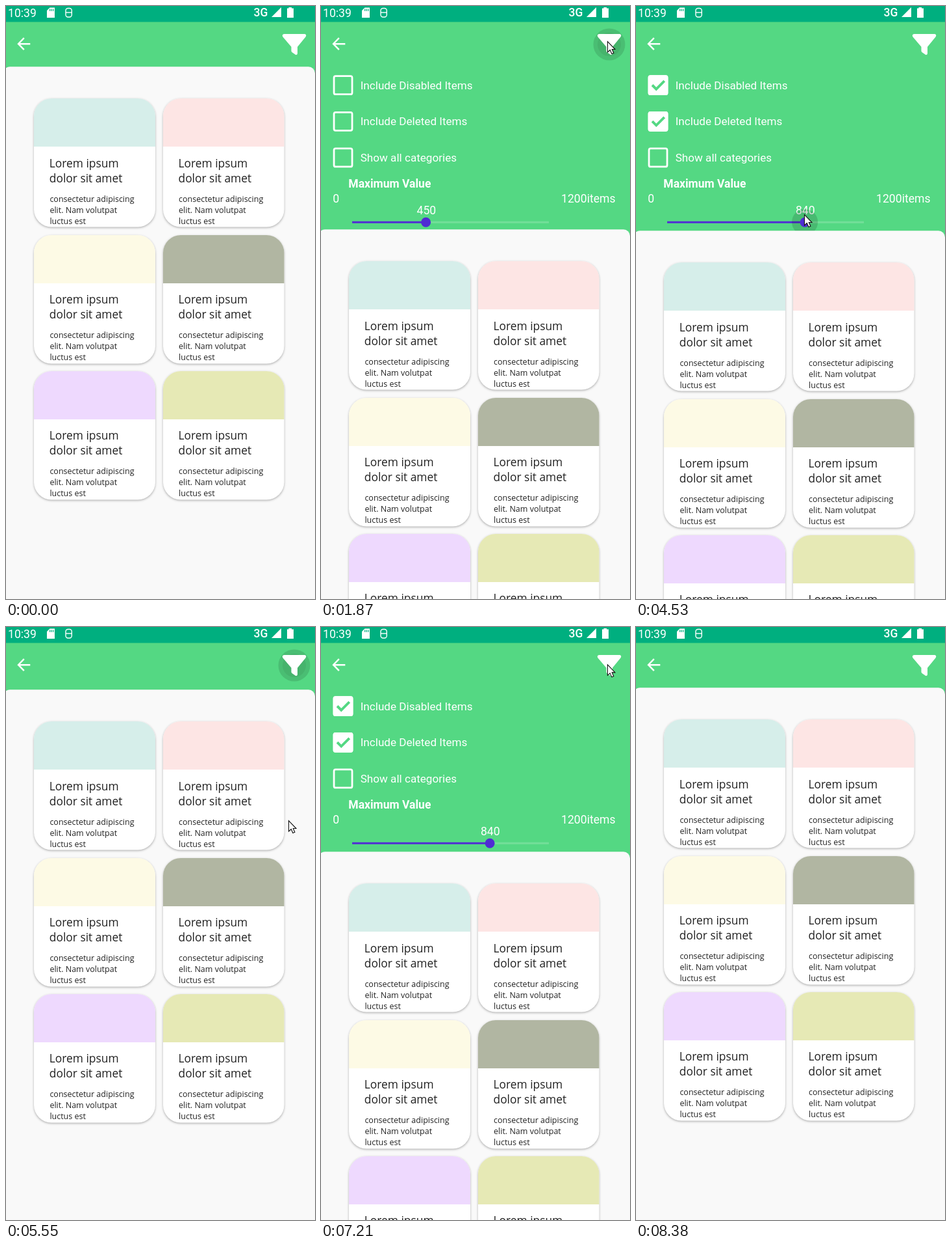
Write an HTML page with a canvas that moves like this. It is 476 px wide and 911 px high and loops after 8.72 s.

```html
<!DOCTYPE html>
<html lang="en">
<head>
<meta charset="utf-8">
<title>Filter panel</title>
<style>
html, body { margin: 0; width: 100%; height: 100%; overflow: hidden; background: #f9f9f9; }
canvas { display: block; width: 476px; height: 911px; }
</style>
</head>
<body>
<canvas id="stage"></canvas>
<script>
const W = 476, H = 911, LOOP = 8720;
const GREEN = '#54d883', TEAL = '#00af7f', INDIGO = '#4f2cd3', INK = '#222';
const CLOSED = 93, OPEN = 345;
const canvas = document.getElementById('stage');
const c = canvas.getContext('2d');
const dpr = window.devicePixelRatio || 1;
canvas.width = W * dpr;
canvas.height = H * dpr;

// Moments at which the sheet starts to toggle
const toggles = [1586, 5272, 6424, 7393];
const DRAG = { start: 4160, time: 340, from: 450, to: 840 };
const rows = [
  { label: 'Include Disabled Items', tick: 2800 },
  { label: 'Include Deleted Items', tick: 3500 },
  { label: 'Show all categories', tick: Infinity }
];

// Pointer trips: departure, duration, destination
const entry = [331, 675], filter = [441, 54];
const trips = [
  [530, 670, filter],
  [1980, 640, [36, 122]],
  [3050, 190, [36, 178]],
  [3620, 420, [161, 320]],
  [DRAG.start, DRAG.time, [259, 320]],
  [4600, 400, filter],
  [5320, 230, [435, 297]],
  [5850, 380, filter],
  [6500, 245, [438, 230]],
  [6900, 340, filter],
  [7400, 160, [447, 352]],
  [7900, 450, [480, 915]]
];

const cards = ['#d6eeea', '#fde5e4', '#fdfae5', '#b1b6a2', '#eed9fe', '#e6e9b5'];

const ramp = (t, a, b) => Math.min(1, Math.max(0, (t - a) / (b - a)));
const glide = (t, start, time) => (1 - Math.cos(Math.PI * ramp(t, start, start + time))) / 2;
const mix = (a, b, p) => a + (b - a) * p;

function text(str, x, y, font, color = '#fff', align = 'left') {
  c.font = font;
  c.fillStyle = color;
  c.textAlign = align;
  c.fillText(str, x, y);
}

function box(x, y, w, h, r) {
  c.beginPath();
  c.roundRect(x, y, w, h, r);
}

function disc(x, y, r, color) {
  c.fillStyle = color;
  c.beginPath();
  c.arc(x, y, r, 0, 7);
  c.fill();
}

function fill(color) {
  c.fillStyle = color;
  c.fill();
}

function shape(d, color) {
  c.fillStyle = color;
  c.fill(new Path2D(d));
}

function line(d, color, width) {
  c.strokeStyle = color;
  c.lineWidth = width;
  c.stroke(new Path2D(d));
}

function sheetTop(t) {
  return Math.floor(toggles.reduce((y, start, i) =>
    mix(y, i % 2 ? CLOSED : OPEN, glide(t, start, 300)), CLOSED));
}

function statusBar() {
  c.fillStyle = TEAL;
  c.fillRect(0, 0, W, 24.5);
  text('10:39', 3, 17, '17.6px Roboto, sans-serif');
  text('3G', 381.5, 16, '500 17.5px Roboto, sans-serif');
  shape('M67.5 2.5H75V18H63V7Z', '#fff');
  for (let x = 67; x < 73; x += 2.6) shape(`M${x} 4.5h1.3v3.2h-1.3Z`, TEAL);
  shape('M424 2V17H409Z', '#fff');
  shape('M435.5 2h4.5v1.5h3V18h-10V3.5h2.5Z', '#fff');
  box(92, 3.5, 9.3, 13.5, 3.5);
  c.strokeStyle = '#fff';
  c.lineWidth = 1.4;
  c.stroke();
  line('M92 10H101', '#fff', 1.4);
}

function ripple(t) {
  for (const start of toggles) {
    const age = t - start;
    const grow = ramp(age, 80, 230);
    const scale = 0.4 + 0.6 * grow;
    c.globalAlpha = grow * (1 - ramp(age, 350, 500));
    disc(444, 59, 24.5 * scale, 'rgba(0,0,0,.12)');
    disc(444, 59, 18 * scale, 'rgba(0,0,0,.06)');
  }
  c.globalAlpha = 1;
}

function appBar(t) {
  line('M27.8 49.2L19 58.2L27.8 67.2M19 58.2H37.3', '#fff', 2.4);
  ripple(t);
  shape('M428 43H460.5Q463.5 44 461.5 47.5L449 62.8V73Q448.5 76 445.5 74.5' +
    'L440.5 71Q439.5 70 439.5 69V62.8L426.5 47.5Q424.5 44 428 43Z', '#fff');
}

function checkbox({ label, tick }, i, t) {
  const y = 121.7 + i * 55.6;
  box(20, y - 14, 28, 28, 2.5);
  c.strokeStyle = '#fff';
  c.lineWidth = 2.8;
  c.stroke();
  c.globalAlpha = t < tick ? 0 : ramp(t, tick, tick + 120);
  box(18.6, y - 15.4, 30.8, 30.8, 3.5);
  fill('#fff');
  line(`M25 ${y - 0.2}l6.2 6.2l12.5 -12.5`, GREEN, 3.9);
  c.globalAlpha = 1;
  text(label, 60.7, Math.round(y + 6), '17.1px Roboto, sans-serif');
}

function slider(t) {
  const raw = mix(DRAG.from, DRAG.to, glide(t, DRAG.start, DRAG.time));
  const value = Math.round(raw / 10) * 10;
  const x = 48 + 303 * value / 1200;
  const font = '17.6px Roboto, sans-serif';
  text('Maximum Value', 42.3, 279, 'bold 17.5px Roboto, sans-serif');
  text('0', 18.3, 302, font);
  text('1200items', 453.5, 302, font, '#fff', 'right');
  text(value, x + 0.7, 320, font, '#fff', 'center');
  c.fillStyle = 'rgba(255,255,255,.18)';
  c.fillRect(48, 330.7, 303, 3);
  c.fillStyle = INDIGO;
  c.fillRect(48, 330.7, x - 48, 3);
  const halo = ramp(t, 4060, 4160) * (1 - ramp(t, 4570, 4700));
  disc(x, 332, 20, `rgba(0,0,0,${0.14 * halo})`);
  disc(x, 332.2, 7.5, INDIGO);
}

function card(color, i, top) {
  const right = i % 2, row = i >> 1;
  const x = right ? 242 : 43, w = right ? 186.5 : 187;
  const y = top + Math.round(row * 209.5), r = 27;
  c.save();
  c.shadowColor = 'rgba(0,0,0,.3)';
  c.shadowBlur = 3.5 * dpr;
  c.shadowOffsetY = 1.3 * dpr;
  box(x, y, w, 197.5, r);
  fill('#fff');
  c.restore();
  box(x, y, w, 74, [r, r, 0, 0]);
  fill(color);

  const tx = right ? 265.5 : 66.8, ty = top + row * 209;
  ['Lorem ipsum', 'dolor sit amet'].forEach((str, n) =>
    text(str, tx, ty + 106 + n * 23, '17.36px "Open Sans", sans-serif', INK));
  ['consectetur adipiscing', 'elit. Nam volutpat', 'luctus est'].forEach((str, n) =>
    text(str, tx + 0.6, ty + 159 + n * 17, '12.5px "Open Sans", sans-serif', INK));
}

function sheet(t) {
  const top = sheetTop(t);
  box(-4, top + 0.3, W + 4, H, [10, 10, 0, 0]);
  fill('#f9f9f9');
  cards.forEach((color, i) => card(color, i, top + 49));
}

function pointer(t) {
  if (t < trips[0][0]) return;
  let [x, y] = entry;
  for (const [start, time, spot] of trips) {
    const p = glide(t, start, time);
    x = mix(x, spot[0], p);
    y = mix(y, spot[1], p);
  }
  const arrow = 'M0 0V16.5L3.8 13L6.4 19L9.4 17.8L6.8 12H11.5Z';
  c.save();
  c.translate(x + 0.5, y + 0.5);
  shape(arrow, '#fff');
  line(arrow, '#111', 1.1);
  c.restore();
}

function draw(t) {
  c.setTransform(dpr, 0, 0, dpr, 0, 0);
  c.fillStyle = GREEN;
  c.fillRect(0, 0, W, H);
  statusBar();
  appBar(t);
  rows.forEach((row, i) => checkbox(row, i, t));
  slider(t);
  sheet(t);
  pointer(t);
}

// The clock advances in steps of 10 ms
const begin = performance.now();
function tick() {
  const t = (performance.now() - begin) % LOOP;
  draw(Math.floor(t / 10 + 0.01) * 10);
  requestAnimationFrame(tick);
}
tick();
</script>
</body>
</html>
```
